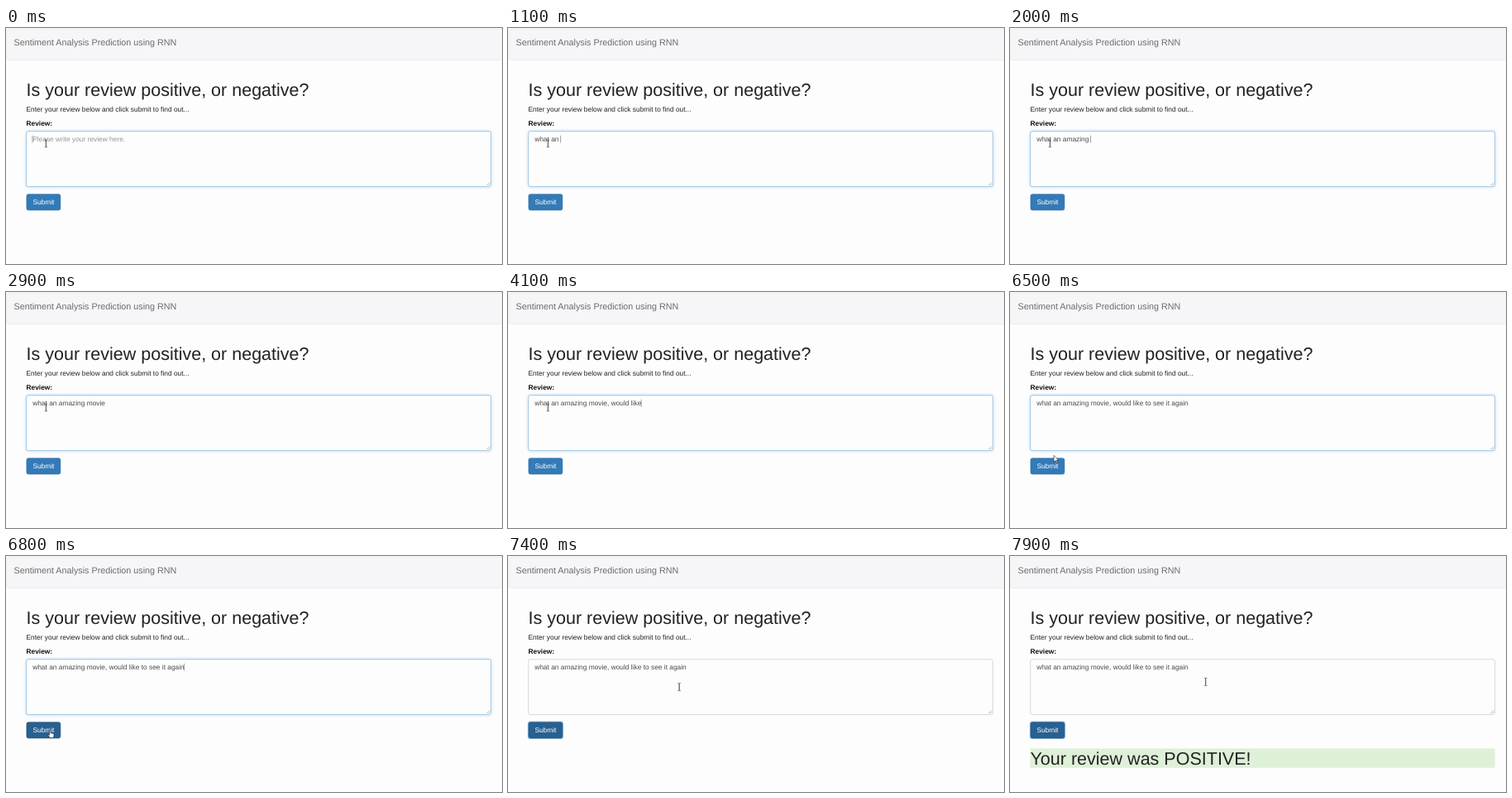
Animation, 600 px wide and 285 px high, one loop 8000 ms. Source, as an HTML page:

```html
<!DOCTYPE html>
<html lang="en">
<head>
<meta charset="utf-8">
<title>Sentiment Analysis Prediction using RNN</title>
<style>
html, body { margin: 0; width: 100%; height: 100%; overflow: hidden; background: #fefdfe; }
svg { display: block; width: 100%; height: 100%; }
text {
  font: 8.37px "Liberation Sans", Arial, sans-serif;
  fill: #222; white-space: pre; text-rendering: geometricPrecision;
}
text.brand { font-size: 10.77px; fill: #6c6c6c; }
text.head { font-size: 21.53px; }
text.label { font-weight: bold; fill: #111; }
#hint { fill: #959595; }
#typed { fill: #4a4a4a; }
#glow { filter: drop-shadow(0 0 2px rgba(102, 175, 233, .4)); }
</style>
</head>
<body>
<svg viewBox="0 0 600 285">
  <rect width="600" height="285" fill="#fefdfe"/>
  <rect x=".3" y="1.2" width="603" height="37.4" rx="2.4" fill="#f6f5f7" stroke="#e8e7e9" stroke-width=".7"/>
  <text class="brand" x="9.5" y="20.6">Sentiment Analysis Prediction using RNN</text>

  <text class="head" x="24.5" y="81.8">Is your review positive, or negative?</text>
  <text x="24.5" y="100.9">Enter your review below and click submit to find out...</text>
  <text class="label" x="24.5" y="118.3">Review:</text>

  <rect x="24.7" y="124.8" width="561.9" height="66.8" rx="2.4" fill="#fefdfe" stroke="#c8c8ca" stroke-width=".7"/>
  <g id="glow">
    <rect x="24.7" y="124.8" width="561.9" height="66.8" rx="2.4" fill="#fefdfe" stroke="#8fc0e0" stroke-width=".75"/>
  </g>
  <path d="M581.6 190l3.6-3.6M583.6 190l1.6-1.6" stroke="#888" stroke-width=".6"/>
  <text id="hint" x="32.2" y="137.4">Please write your review here.</text>
  <text id="typed" x="32.2" y="137.4" xml:space="preserve"></text>
  <path id="caret" d="M-.2 129.8v8.8" stroke="#666" stroke-width=".6"/>

  <rect id="ring" x="24.3" y="200.1" width="42.2" height="20.4" rx="2.6" fill="none" stroke="#9cc8f0" stroke-width="1.1"/>
  <rect id="button" x="24.9" y="200.7" width="41" height="19.3" rx="2.2" stroke-width=".6"/>
  <text x="45.4" y="213.3" text-anchor="middle" style="fill:#fff">Submit</text>

  <g id="result">
    <rect x="24.5" y="232.4" width="562.2" height="23.4" fill="#dff0d8"/>
    <text class="head" x="24.5" y="251.6">Your review was POSITIVE!</text>
  </g>

  <g id="pointer">
    <path id="beam" d="M-1.6-4.5h1.3q.5 0 .5.6v7.8q0 .6-.5.6H-1.6M2-4.5H.7q-.5 0-.5.6v7.8q0 .6.5.6H2" fill="none" stroke="#333" stroke-width=".6"/>
    <path id="arrow" d="M0 0v8l1.9-1.7 1.3 2.9 1.2-.5-1.3-2.9h2.6z" fill="#fff" stroke="#222" stroke-width=".6"/>
    <path id="hand" d="M-.8 5V.7q0-.7.7-.7t.7.7v3l3.1.7q.9.2.9 1.2l-.6 4H-.2L-2.5 6.4q.5-1.2 1.7-.2z" fill="#fff" stroke="#222" stroke-width=".6"/>
  </g>
</svg>
<script>
const LOOP = 8000, STEP = 100;
const REVIEW = "what an amazing movie, would like to see it again";
const BLUR = 6900, RESULT = 7700;
const $ = id => document.getElementById(id);

// Typing bursts: start time, then characters added on each step
const bursts = [
  [100, "1111"], [600, "1"], [800, "11"], [1100, "1111"], [1600, "2"],
  [1800, "111"], [2200, "11111"], [3000, "111111111"], [4000, "21111"],
  [4600, "111"], [5000, "2"], [5200, "21"], [5500, "11111"]
];
const keys = bursts.flatMap(([start, counts]) =>
  [...counts].map((n, i) => ({ time: start + i * STEP, n: +n })));

// Pointer path: time, x, y
const path = [
  [6200, 48.2, 139.4], [6300, 49, 157], [6400, 51.5, 180], [6500, 53, 197.3],
  [6600, 53.5, 204], [6800, 53.5, 210], [7000, 54, 210], [7100, 72, 200],
  [7200, 118, 180], [7300, 168, 166], [7400, 207, 158.2], [7600, 228, 153.5],
  [7800, 236.5, 152]
];

function pointerAt(t) {
  const next = path.findIndex(p => p[0] > t);
  if (next === 0) return path[0].slice(1);
  if (next < 0) return path[path.length - 1].slice(1);
  const a = path[next - 1], b = path[next];
  const k = (t - a[0]) / (b[0] - a[0]);
  return [a[1] + (b[1] - a[1]) * k, a[2] + (b[2] - a[2]) * k];
}

const inside = (x, y, l, t, r, b) => x >= l && x <= r && y >= t && y <= b;
const show = (id, on) => $(id).setAttribute("visibility", on ? "visible" : "hidden");

function draw(t) {
  const done = keys.filter(k => k.time <= t);
  const count = done.reduce((sum, k) => sum + k.n, 0);
  const idle = done.length ? t - done[done.length - 1].time : t;
  const typed = $("typed");
  typed.textContent = REVIEW.slice(0, count);
  show("hint", count === 0);

  const width = count ? typed.getComputedTextLength() : 0;
  $("caret").setAttribute("transform", `translate(${32.2 + width} 0)`);
  show("caret", t < BLUR && (idle < 300 || idle >= 800));
  $("glow").style.opacity = Math.max(0, Math.min(1, 1 - (t - BLUR) / 150));

  const [x, y] = pointerAt(t);
  const overText = inside(x, y, 24, 124, 587, 192);
  const overButton = inside(x, y, 24, 200, 66, 221);
  $("pointer").setAttribute("transform", `translate(${x} ${y})`);
  show("beam", overText);
  show("hand", overButton);
  show("arrow", !overText && !overButton);

  const dark = overButton || t >= BLUR;
  $("button").setAttribute("fill", dark ? "#286090" : "#337ab7");
  $("button").setAttribute("stroke", dark ? "#204d74" : "#2e6da4");
  show("ring", t >= BLUR);
  show("result", t >= RESULT);
}

const begin = performance.now();
function tick() {
  const t = (performance.now() - begin) % LOOP;
  draw(Math.floor(t / STEP) * STEP);
  requestAnimationFrame(tick);
}
tick();
</script>
</body>
</html>
```
